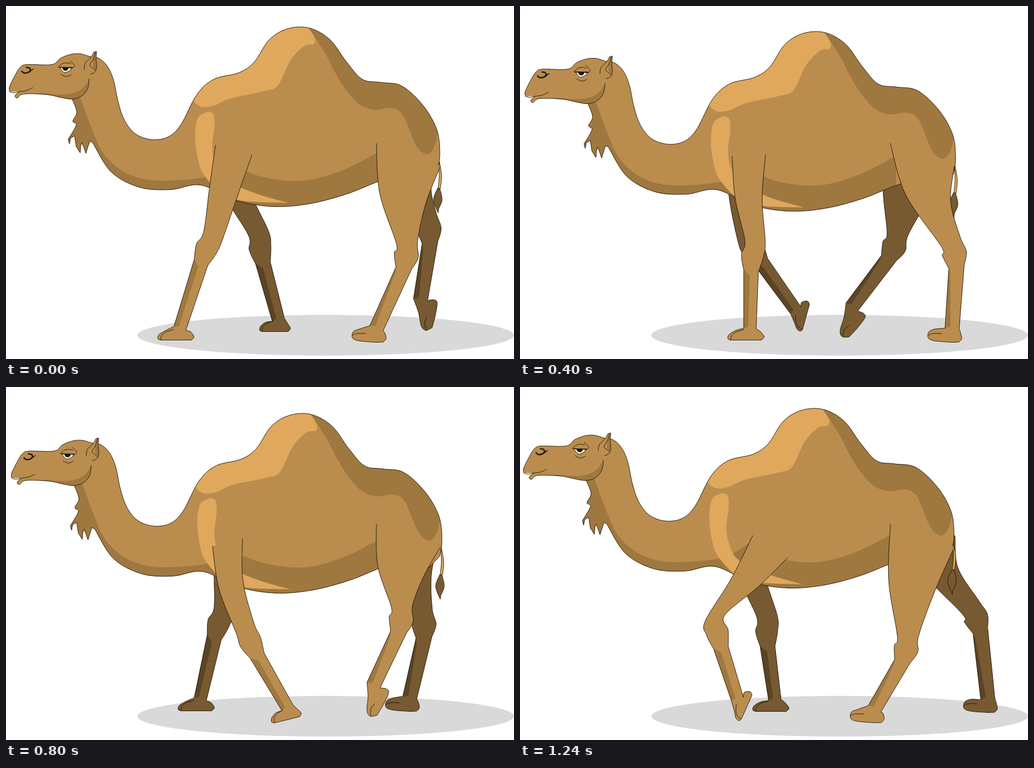
Recreate the animation shown at these times as an HTML page with a canvas. Size 897 by 624 pixels, loop 1.28 s.

```html
<!DOCTYPE html>
<html lang="en">
<head>
<meta charset="utf-8">
<title>Walking camel</title>
<style>
html, body { margin: 0; width: 100%; height: 100%; overflow: hidden; background: #fff; }
canvas { display: block; }
</style>
</head>
<body>
<canvas id="stage" width="897" height="624"></canvas>
<script>
const ctx = document.getElementById('stage').getContext('2d');
const COAT = '#ba8d4e', LIGHT = '#dfa85d', SHADE = '#9f7840';
const FAR = '#775a31', FAR_SHADE = '#5a4425', INK = '#1c1409';

// Smooth curve through each run of x,y points; runs are joined by lines.
function curve(...runs) {
  const path = new Path2D();
  runs.forEach((run, r) => {
    const last = run.length / 2 - 1;
    const at = i => {
      const j = 2 * Math.max(0, Math.min(last, i));
      return [run[j], run[j + 1]];
    };
    path[r ? 'lineTo' : 'moveTo'](...at(0));
    for (let i = 0; i < last; i++) {
      const [a, b, c, d] = [at(i - 1), at(i), at(i + 1), at(i + 2)];
      path.bezierCurveTo(b[0] + (c[0] - a[0]) / 6, b[1] + (c[1] - a[1]) / 6,
        c[0] - (d[0] - b[0]) / 6, c[1] - (d[1] - b[1]) / 6, c[0], c[1]);
    }
  });
  return path;
}

function fill(path, color) {
  ctx.fillStyle = color;
  ctx.fill(path);
}

function ink(path, width = 0.9) {
  ctx.strokeStyle = INK;
  ctx.lineWidth = width;
  ctx.stroke(path);
}

// Rotate points and move them to an origin.
function place(points, [ox, oy], angle, scaleX = 1) {
  const c = Math.cos(angle), s = Math.sin(angle), out = [];
  for (let i = 0; i < points.length; i += 2) {
    const x = points[i] * scaleX, y = points[i + 1];
    out.push(ox + x * c - y * s, oy + x * s + y * c);
  }
  return out;
}

// Each leg hangs from its top and holds eight poses of knee and ankle per stride.
const foreleg = {
  hips: [[402, 255], [403, 258], [404, 265], [399, 277], [393, 278], [391, 275], [395, 268], [442, 282]],
  knees: [[355, 428], [376, 435], [411, 441], [436, 449], [449, 445], [432, 450], [412, 447], [349, 434]],
  ankles: [[307, 570], [343, 570], [406, 570], [450, 571], [481, 573], [497, 567], [487, 556], [384, 552]],
  top(pose) {
    const hip = this.hips[pose], knee = this.knees[pose];
    const dx = knee[0] - hip[0], half = 30 - 0.07 * dx;
    return place([-half, 0, half, 0], hip, -Math.atan2(dx, knee[1] - hip[1]));
  },
  bulge: [-5, -5],
  ankleWidth: 11,
  kneeFront: [-15, -26, -20, -1, -15, 26],
  kneeBack: [11, 29, 19, 1, 21, -26],
  shade: [-15, 25, -4, 36],
  farShift: () => [0, -18],
  foot: pose => ({
    turn: [-0.24, -1.3, -1.15][pose - 5] || 0,
    scale: pose < 4 ? 1 : 0.85,
    toe: [-26, 4, -37, 11, -39, 18, -34, 20.5],
    heel: [20, 20.5, 25, 15, 19, 6],
    line: [-11, 2, -24, 6, -32, 12, -34, 20]
  })
};

const isLifted = pose => pose > 3 && pose < 7;

const hindleg = {
  knees: [[707, 440], [737, 439], [767, 437], [804, 428], [752, 400], [698, 410], [666, 430], [682, 462]],
  ankles: [[654, 570], [712, 569], [763, 570], [825, 571], [737, 525], [649, 527], [591, 538], [626, 569]],
  top: () => [654, 243, 767, 283],
  bulge: [-12, -6],
  ankleWidth: 12.5,
  kneeFront: [-24, -12, -21, 5, -9, 27],
  kneeBack: [18, 20, 21, -4, 9, -30],
  shade: [-9, 27, -6, 36],
  farShift: pose => isLifted(pose) ? [-5, -6] : [1, -20],
  foot: (pose, shin) => isLifted(pose)
    ? {
      turn: shin - 0.36, scale: 1,
      toe: [-9, 21, -10, 45, -4, 55, 8, 53],
      heel: [18, 35, 27, 13, 23, 6],
      line: [-3, 54, -3, 42, 3, 33]
    }
    : {
      turn: 0, scale: 1,
      toe: [-30, 1, -41, 6, -42, 17, -30, 22, 0, 24.5],
      heel: [12, 24, 17, 18, 15, 8],
      line: [-42, 12, -35, 9, -19, 9]
    }
};

function drawLeg(leg, pose, far) {
  const knee = leg.knees[pose], ankle = leg.ankles[pose];
  const [frontX, frontY, backX, backY] = leg.top(pose);
  const shin = -Math.atan2(ankle[0] - knee[0], ankle[1] - knee[1]);
  const foot = leg.foot(pose, shin);
  const onKnee = points => place(points, knee, shin);
  const onAnkle = points => place(points, ankle, shin);
  const onFoot = points => place(points, ankle, foot.turn, foot.scale);

  // The thigh bows more the further the knee swings back.
  const swing = 0.1 * (knee[0] - (frontX + backX) / 2);
  const front = onKnee(leg.kneeFront), back = onKnee(leg.kneeBack);
  const bow = (x, y, notch, bulge) => [(x + notch[0]) / 2 + bulge - swing, (y + notch[1]) / 2];
  const outline = curve(
    [frontX, frontY, ...bow(frontX, frontY, front, leg.bulge[0]), ...front],
    [...onAnkle([-leg.ankleWidth, 0]), ...onFoot(foot.toe)],
    [...onFoot(foot.heel), ...onAnkle([leg.ankleWidth, 0])],
    [...back, ...bow(backX, backY, back.slice(-2), leg.bulge[1]), backX, backY]
  );
  const [a, b, c, d, ...shinEnd] = [...onKnee(leg.shade), ...onAnkle([-3, -3, -leg.ankleWidth, 0])];

  ctx.save();
  if (far) ctx.translate(...leg.farShift(pose));
  fill(outline, far ? FAR : COAT);
  fill(curve([a, b], [c, d], shinEnd), far ? FAR_SHADE : SHADE);
  ink(outline);
  ink(curve(onFoot(foot.line)));
  ctx.restore();
}

const back = [147, 90, 163, 93, 178, 107, 189, 132, 197, 170, 208, 202, 227, 226, 255, 236.5,
  285, 232, 308, 210, 336, 157, 366, 130, 410, 118.5, 437, 100, 464, 60, 497, 40.5, 535, 39.5,
  571, 60, 600, 99, 628, 130, 660, 135.5, 698, 142, 736, 177, 760, 220, 765, 262, 761, 290];
const belly = [740, 312, 690, 303, 656, 311, 600, 333, 535, 350, 470, 355, 405, 344, 343, 317,
  290, 325, 235, 321, 185, 294, 152, 242];
const beard = [[147, 239, 140, 261], [137, 252, 133, 242], [131, 248, 130, 260], [123, 249, 120, 230],
  [113, 234, 111, 244], [109, 236, 123, 211, 117, 204, 124, 188, 115, 163]];
const bodyPath = curve(back, belly, ...beard);

// Patches may overrun the body; they are clipped to it.
const bodyPatches = [
  [SHADE, curve([131, 164, 149, 213, 169, 258, 200, 289, 240, 306, 290, 309, 358, 301, 403, 276],
    [412, 330, 350, 335, 200, 335, 90, 270, 100, 150])],
  [SHADE, curve([415, 289, 450, 302, 500, 309.5, 545, 306, 600, 288, 660, 257], [660, 340, 470, 365, 390, 350])],
  [LIGHT, curve([357, 187, 338, 198, 333, 235, 340, 280, 352, 304, 378, 331, 402, 342, 440, 347, 497, 348.5],
    [497, 348.5, 435, 330, 385, 306, 369, 280, 363, 250, 367, 215, 366, 193, 357, 187])],
  [LIGHT, curve([320, 155, 340, 177, 365, 177, 395, 164, 455, 151, 479, 141, 501, 97, 525, 71.5, 542, 68, 544, 57, 533, 39],
    [533, 25, 450, 30, 380, 100])],
  [SHADE, curve([533, 38, 562, 83, 580, 118, 600, 150, 624, 175, 650, 184, 680, 181, 700, 194, 721, 243, 735, 260, 747, 261, 757, 246, 761, 228],
    [800, 220, 740, 120, 620, 80, 560, 30])]
];

const skull = [6, 152, 5, 144, 14, 125, 24, 109, 36, 104, 80, 104, 95, 93, 113, 86, 130, 85, 147, 90];
const jaw = [146, 129, 143, 147, 132, 160, 115, 165, 95, 162, 70, 157, 30, 156, 19, 163, 15, 159, 22, 152];
const mouth = [6, 152, 13, 154, 22, 152, 35, 150, 46, 145];
const headPath = curve(skull, [155, 110], jaw);
const jawShade = curve([60, 154, 90, 157, 115, 155, 134, 146, 146, 129], [155, 165, 110, 175, 60, 165]);
const ear = curve([137, 112, 139, 101, 149, 91, 154, 82], [159, 81, 158, 95, 159, 108, 156, 117, 148, 121]);
const earShade = curve([157, 82, 153, 96, 153, 108, 157, 114], [159, 108, 158, 82]);
const eye = curve([94, 109, 114, 109.5], [113, 114, 102, 118, 94, 109]);
const wrinkles = [
  [91, 109, 96, 104, 103, 101, 113, 102], [112, 97, 120, 106, 115, 111],
  [96, 121, 101, 124, 107, 125, 114, 122], [153, 95, 147, 105, 152, 110, 157, 114], [157, 82, 153, 95]
].map(run => curve(run));
const nostril = curve([27, 116, 31, 119, 38, 118, 42, 114, 40, 110, 35, 109]);

const tail = curve([763, 272, 764, 300, 762, 323], [766, 323, 768, 300, 764, 275]);
const tuft = curve([761, 323, 754, 343, 762, 366], [763, 359, 769, 343, 765, 323], [761, 323]);

function fillInside(path, base, patches) {
  fill(path, base);
  ctx.save();
  ctx.clip(path);
  for (const [color, patch] of patches) fill(patch, color);
  ctx.restore();
}

function drawTail() {
  fill(tail, LIGHT);
  ink(tail);
  fill(tuft, FAR);
  ink(tuft);
}

function drawHead() {
  fillInside(headPath, COAT, [[SHADE, jawShade]]);
  for (const run of [skull, jaw, mouth]) ink(curve(run));
  fill(ear, COAT);
  fill(earShade, SHADE);
  ink(ear);
  fill(eye, '#fff');
  ctx.beginPath();
  ctx.arc(104, 109.5, 5.5, 0, Math.PI);
  ctx.fillStyle = INK;
  ctx.fill();
  ink(eye);
  ink(curve([93, 109, 116, 109.5]), 1.6);
  wrinkles.forEach(w => ink(w));
  ink(nostril, 2.4);
  ink(curve([40, 117, 47, 112]), 1.4);
}

function drawBody(frame) {
  const bob = 1 - Math.abs(1 - frame / 16);
  ctx.save();
  ctx.translate(1 + 5 * bob, 13 * bob - 0.5);
  drawTail();
  fillInside(bodyPath, COAT, bodyPatches);
  ink(bodyPath);
  drawHead();
  ctx.restore();
}

function render(now) {
  const frame = Math.floor(now % 1280 / 40);
  const near = frame >> 2, far = (near + 4) % 8;
  ctx.fillStyle = '#fff';
  ctx.fillRect(0, 0, 897, 624);
  ctx.fillStyle = '#d9d9d9';
  ctx.beginPath();
  ctx.ellipse(564.5, 582, 332.5, 36, 0, 0, 2 * Math.PI);
  ctx.fill();
  drawLeg(foreleg, far, true);
  drawLeg(hindleg, far, true);
  drawBody(frame);
  drawLeg(hindleg, near, false);
  drawLeg(foreleg, near, false);
}

const start = performance.now();
function tick() {
  render(performance.now() - start);
  requestAnimationFrame(tick);
}
ctx.lineJoin = ctx.lineCap = 'round';
tick();
</script>
</body>
</html>
```
